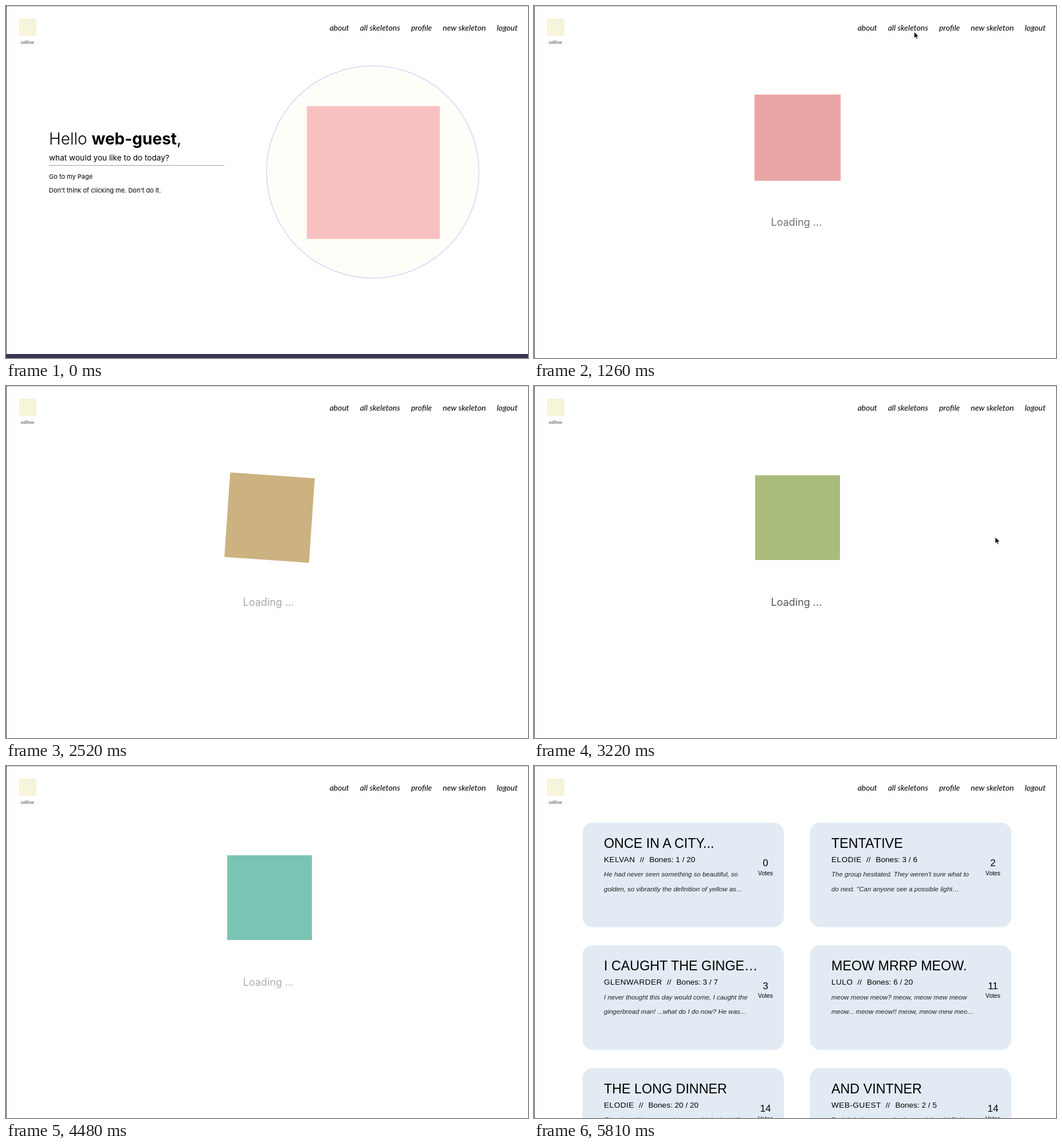
An HTML page for the animation above (5.95 s loop, 911 by 615 pixels).

```html
<!DOCTYPE html>
<html lang="en">
<head>
<meta charset="utf-8">
<title>Skeletons</title>
<style>
  html, body { margin: 0; width: 100%; height: 100%; overflow: hidden; background: #fff; }
  svg { display: block; width: 911px; height: 615px; font-family: Inter, sans-serif; }
  .nav { font: italic 14px Lato, sans-serif; }
  .card { font-family: "Liberation Sans", Arial, sans-serif; }
  .card .title { font-size: 23.3px; }
  .card .meta { font-size: 13.6px; }
  .card .story { font-size: 11.5px; font-style: italic; fill: #222; }
  .card .count { font-size: 17px; text-anchor: middle; }
  .card .votes { font-size: 10.3px; text-anchor: middle; }
</style>
</head>
<body>
<svg viewBox="0 0 911 615">
  <g id="home">
    <g id="hero">
      <circle cx="640" cy="290" r="181" fill="#fffdf8"/>
      <circle cx="640" cy="290" r="185.3" fill="none" stroke="#dcdcf0" stroke-width="1.8"/>
      <rect x="525" y="175" width="232" height="232" fill="#f8c1c1"/>
    </g>
    <text x="75" y="242" font-size="28" font-weight="300">Hello <tspan font-weight="700">web-guest</tspan><tspan font-weight="400">,</tspan></text>
    <text x="75" y="270" font-size="13.6">what would you like to do today?</text>
    <path d="M75 278.5H381" stroke="#a0a0a0"/>
    <text x="75" y="302" font-size="11">Go to my Page</text>
    <text x="75" y="326" font-size="11">Don't think of clicking me. Don't do it.</text>
    <path d="M0 608H911V615H0Z" fill="#353553"/>
  </g>
  <g id="loading">
    <rect id="loader" x="-74" y="-74" width="148" height="148" fill="#eaa5a5"/>
    <text id="label" x="413.5" y="384" font-size="18">Loading ...</text>
  </g>
  <g id="cards"></g>
  <rect x="23" y="22" width="30" height="30" fill="#f6f4da"/>
  <text class="nav" x="37.5" y="66" text-anchor="middle" style="font-size:8.5px" fill="#444">odilow</text>
  <text id="nav" class="nav" x="893" y="43" text-anchor="end"></text>
  <path d="M0 .5H911" stroke="#bdbdbd"/>
  <path d="M.5 0V615" stroke="#444"/>
  <path id="cursor" d="M0 0V11.2L2.6 8.8L4.3 12.7L6.1 11.9L4.4 8.1H7.8Z" stroke="#fff" stroke-width=".8"/>
</svg>
<script>
const $ = id => document.getElementById(id);
const LOOP = 5950, STEP = 70;
const HOVER = 490, CLICK = 1190, WIGGLE = 2400, EXIT = 4130, LOADED = 5320;

$('nav').innerHTML = ['about', 'all skeletons', 'profile', 'new skeleton', 'logout']
  .map((name, i) => `<tspan dx="${i && 19}">${name}</tspan>`).join('');

const stories = [
  ['ONCE IN A CITY...', 'KELVAN', '1 / 20', 0, 'He had never seen something so beautiful, so', 'golden, so vibrantly the definition of yellow as…'],
  ['TENTATIVE', 'ELODIE', '3 / 6', 2, "The group hesitated. They weren't sure what to", 'do next. "Can anyone see a possible light…'],
  ['I CAUGHT THE GINGE…', 'GLENWARDER', '3 / 7', 3, 'I never thought this day would come, I caught the', 'gingerbread man! ...what do I do now? He was…'],
  ['MEOW MRRP MEOW.', 'LULO', '6 / 20', 11, 'meow meow meow? meow, meow mew meow', 'meow... meow meow!! meow, meow mew meo…'],
  ['THE LONG DINNER', 'ELODIE', '20 / 20', 14, 'She played her way and never paid the last bill', ''],
  ['AND VINTNER', 'WEB-GUEST', '2 / 5', 14, 'Dark light hung over the bar, and the old Girl had', '']
];
$('cards').innerHTML = stories.map(([title, author, bones, votes, first, second], i) => `
  <g class="card" transform="translate(${84.5 + i % 2 * 397} ${98.7 + (i >> 1) * 214.5})">
    <rect width="351.5" height="182.8" rx="18" fill="#e2ebf4"/>
    <text class="title" x="37.5" y="44.3">${title}</text>
    <text class="meta" x="37.5" y="69"><tspan letter-spacing=".5">${author}</tspan><tspan dx="8">//</tspan><tspan dx="9">Bones: ${bones}</tspan></text>
    <text class="story" x="37.5" y="94.5">${first}</text>
    <text class="story" x="37.5" y="120">${second}</text>
    <text class="count" x="319.5" y="76.5">${votes}</text>
    <text class="votes" x="319.5" y="92">Votes</text>
  </g>`).join('');

// Stops of the pointer: time, x, y.
const stops = [[HOVER, 570, 330], [770, 585, 129], [1120, 650, 38], [1820, 780, 106],
  [2500, 912, 250], [2940, 803, 255], [3220, 805, 264], [EXIT, 812, 616]];

const progress = (t, from, to) => Math.min(1, Math.max(0, (t - from) / (to - from)));
const show = (id, visible) => $(id).setAttribute('display', visible ? 'inline' : 'none');
const setHue = (id, degrees) => { $(id).style.filter = `hue-rotate(${degrees}deg)`; };

function pointerAt(t) {
  let [, x, y] = stops[0];
  for (let i = 1; i < stops.length; i++) {
    const k = progress(t, stops[i - 1][0], stops[i][0]);
    const eased = k * k * (3 - 2 * k);
    x += (stops[i][1] - stops[i - 1][1]) * eased;
    y += (stops[i][2] - stops[i - 1][2]) * eased;
  }
  return [x, y];
}

function draw(t) {
  show('home', t < CLICK);
  show('loading', t >= CLICK && t < LOADED);
  show('cards', t >= LOADED);
  show('cursor', t >= HOVER && t < EXIT);
  $('cursor').setAttribute('transform', `translate(${pointerAt(t)})`);

  const hover = progress(t, HOVER, 1120);
  setHue('hero', 115 * hover * (2 - hover));

  // One swell, then one wiggle, while the hue speeds up steadily.
  const waited = Math.max(0, t - CLICK) / 1000;
  const scale = 1 + .1 * Math.sin(Math.PI * progress(t, CLICK, WIGGLE + 50));
  const angle = 4 * Math.sin(2 * Math.PI * progress(t, WIGGLE, 2940));
  setHue('loader', waited * (28.3 + 6.7 * waited));
  $('loader').setAttribute('transform', `translate(460 230) rotate(${angle}) scale(${scale})`);
  $('label').setAttribute('opacity', .475 + .225 * Math.cos(2 * Math.PI * (t - 3450) / 2700));
}

const start = performance.now();
function tick() {
  const t = (performance.now() - start) % LOOP;
  draw(Math.floor(t / STEP) * STEP);
  requestAnimationFrame(tick);
}
tick();
</script>
</body>
</html>
```
